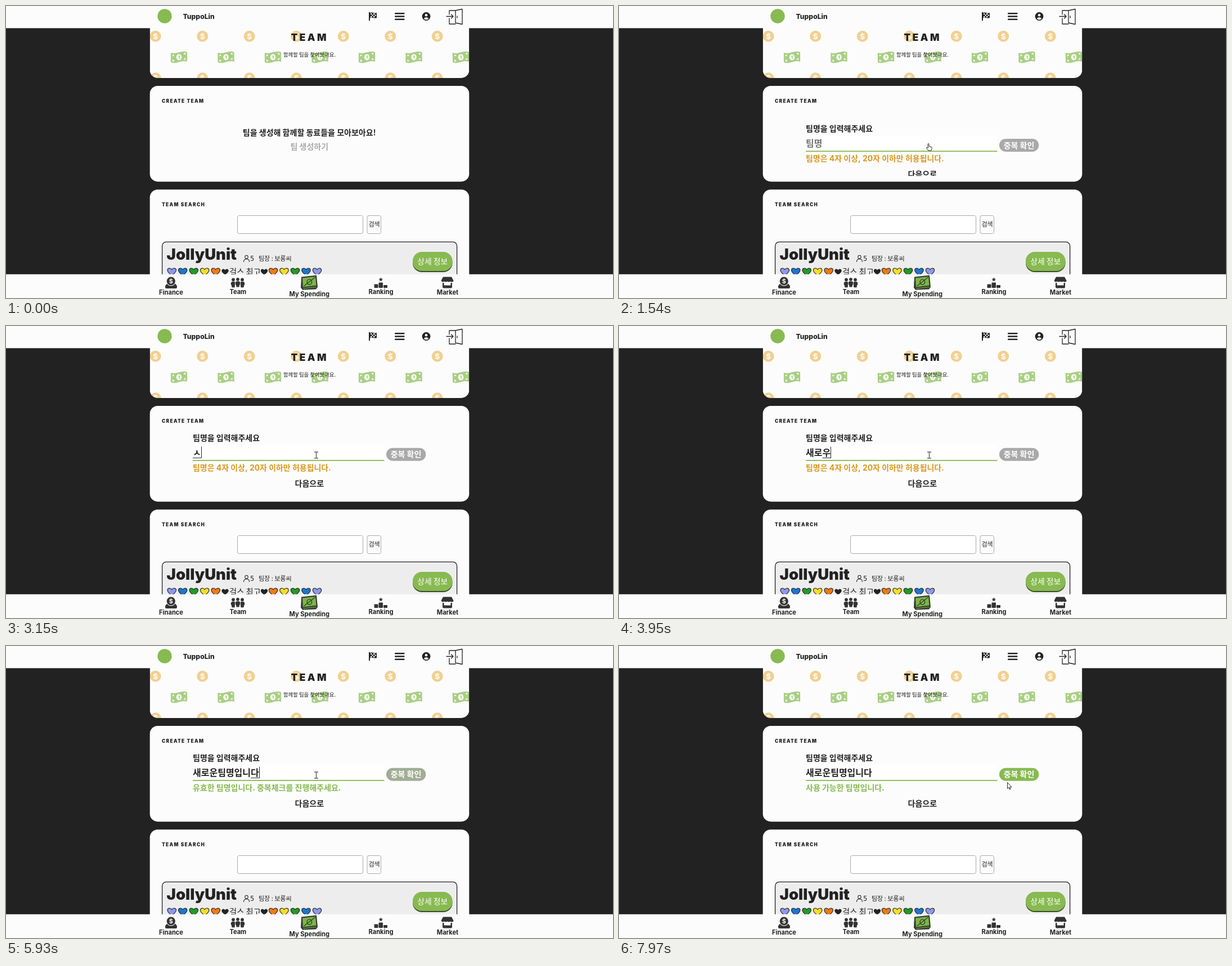
An HTML page with a canvas for the animation above (8 s loop, 1079 by 519 pixels).

```html
<!DOCTYPE html>
<html lang="ko">
<head>
<meta charset="utf-8">
<title>Team</title>
<style>
html, body { margin: 0; width: 100%; height: 100%; overflow: hidden; background: #222; }
canvas { display: block; width: 1079px; height: 519px; }
</style>
</head>
<body>
<canvas id="stage" width="1079" height="519"></canvas>
<script>
const ctx = document.getElementById('stage').getContext('2d');
const LOOP = 8000;
const INK = '#222', PAPER = '#fcfcfc', GREEN = '#87ba51', AMBER = '#d9981f', ICON = '#333';
const KR = '"Noto Sans CJK KR", sans-serif';
const LATIN = 'Inter, "Noto Sans CJK KR", sans-serif';
const LEFT = 255.7, WIDTH = 567.6;

// ---- helpers ----
function box(x, y, w, h, r, fill, stroke, lw = 1) {
  ctx.beginPath();
  ctx.roundRect(x, y, w, h, r);
  if (fill) { ctx.fillStyle = fill; ctx.fill(); }
  if (stroke) { ctx.strokeStyle = stroke; ctx.lineWidth = lw; ctx.stroke(); }
}

function disc(x, y, r, fill, ry = r) {
  ctx.beginPath();
  ctx.ellipse(x, y, r, ry, 0, 0, 7);
  ctx.fillStyle = fill;
  ctx.fill();
}

function shape(d, x, y, scale, fill, stroke, lw = 1) {
  const p = new Path2D(d);
  ctx.save();
  ctx.translate(x, y);
  ctx.scale(scale, scale);
  ctx.lineJoin = ctx.lineCap = 'round';
  if (fill) { ctx.fillStyle = fill; ctx.fill(p); }
  if (stroke) { ctx.strokeStyle = stroke; ctx.lineWidth = lw; ctx.stroke(p); }
  ctx.restore();
}

// y is the middle of the capitals
function text(s, x, y, size, { weight = 700, font = KR, color = INK, align = 'left', gap = 0 } = {}) {
  ctx.font = `${weight} ${size}px ${font}`;
  ctx.letterSpacing = gap + 'px';
  ctx.textAlign = align;
  ctx.fillStyle = color;
  ctx.fillText(s, x, y + size * 0.365);
  ctx.letterSpacing = '0px';
}

const heading = (s, y) => text(s, 277, y, 8.4, { weight: 900, font: LATIN, gap: 1.3 });

function clip(x, y, w, h, r, draw) {
  ctx.save();
  ctx.beginPath();
  ctx.roundRect(x, y, w, h, r);
  ctx.clip();
  draw();
  ctx.restore();
}

const clamp = v => Math.max(0, Math.min(1, v));
const mix = (a, b, k) => `rgb(${a.map((v, i) => Math.round(v + (b[i] - v) * k))})`;

// CSS "ease"
function ease(x) {
  let lo = 0, hi = 1;
  const curve = (s, a, b) => 3 * (1 - s) ** 2 * s * a + 3 * (1 - s) * s * s * b + s ** 3;
  for (let i = 0; i < 20; i++) {
    const mid = (lo + hi) / 2;
    if (curve(mid, 0.25, 0.25) < x) lo = mid; else hi = mid;
  }
  return curve(lo, 0.1, 1);
}

const lastBefore = (list, t) => list.filter(k => k[0] <= t).pop();

// ---- fixed page ----
function coin(x, y) {
  disc(x, y, 10, '#f2d091');
  text('$', x, y, 13.5, { font: LATIN, color: PAPER, align: 'center' });
}

const NOTE = 'M-14.6-8C-9-6-5-7.4 0-8.7S9-11 13.3-9.6q1.3.4 1.3 1.8V8C9 6 5 7.4 0 8.7S-9 11-13.3 9.6q-1.3-.4-1.3-1.8z';
const NOTE_CORNERS = 'M-11.6-4.6q2 .4 3.4.2q-.6 2.8-3.4 3zM11.6 4.6q-2-.4-3.4-.2q.6-2.8 3.4-3z' +
  'M11.6-7.4q-2-.4-3.4.1q.6 2.8 3.4 3zM-11.6 7.4q2 .4 3.4-.1q-.6-2.8-3.4-3z';

function note(x, y) {
  shape(NOTE, x, y, 1, '#a9cf84');
  shape(NOTE_CORNERS, x, y, 1, PAPER);
  disc(x, y, 4.8, PAPER, 5.4);
  text('1', x, y, 8, { weight: 800, font: LATIN, color: '#a0c977', align: 'center' });
}

function banner() {
  clip(LEFT, 20, WIDTH, 107.9, 14, () => {
    ctx.fillStyle = PAPER;
    ctx.fillRect(LEFT, 20, WIDTH, 108);
    for (let i = 0; i < 7; i++) {
      coin(265.7 + i * 83.5, 53.7);
      coin(265.7 + i * 83.5, 128.3);
      note(307.5 + i * 83.5, 91);
    }
  });
  text('TEAM', 506.5, 55.8, 17.3, { weight: 900, font: LATIN, gap: 3.4 });
  text('함께할 팀을 찾아보아요.', 539.5, 87, 9.4, { weight: 400, align: 'center' });
}

function header() {
  ctx.fillStyle = PAPER;
  ctx.fillRect(0, 0, 1079, 39.4);
  disc(282, 18, 12.7, GREEN);
  text('TuppoLin', 314.5, 18.8, 12.2, { weight: 800, font: LATIN });

  // chequered flag
  ctx.fillStyle = INK;
  ctx.fillRect(645, 11, 2, 15);
  shape('M2 1q3-1 6 0t6 0V10q-3 1-6 0t-6 0z', 645, 11, 1, INK);
  ctx.fillStyle = PAPER;
  for (let i = 0; i < 6; i++) ctx.fillRect(648 + (i % 2) * 5 + (i > 1 && i < 4 ? 2.5 : 0), 13 + (i >> 1) * 2.5, 2.3, 2.2);

  for (const y of [12, 17.2, 22.4]) box(691, y, 17.5, 2.6, 1, INK);

  disc(747, 18.5, 7.4, INK);
  disc(747, 16.3, 2.3, PAPER);
  shape('M-4.2 4q1-2.6 4.2-2.6t4.2 2.6q-1.8 1.9-4.2 1.9t-4.2-1.9z', 747, 18.5, 1, PAPER);

  // door with arrow
  shape('M5 10V3H16M5 17V27H16M16 3L28 .5V27.5L16 25zM0 13.5H12M8.5 10L12 13.5L8.5 17M19 13v3', 783, 5, 1, null, INK, 1.3);
}

const HEART = 'M0 6C-4 3-7.7 0-7.7-3.2C-7.7-7.6-2-8.2 0-4.4C2-8.2 7.7-7.6 7.7-3.2C7.7 0 4 3 0 6z';
const HUES = ['#8c99ec', '#1d76cf', '#249a27', '#f8dd25', '#ee7a18'];

function search() {
  box(LEFT, 326.2, WIDTH, 220, 14, PAPER);
  heading('TEAM SEARCH', 352.8);
  box(411.5, 372.5, 223, 32, 3, '#fff', '#aaa');
  box(642, 372.5, 24.5, 32, 3, PAPER, '#aaa');
  text('검색', 654.5, 388, 11, { weight: 400, align: 'center' });

  box(277.6, 419.4, 524, 120, 7, '#ededed', INK, 1.3);
  text('JollyUnit', 285.5, 440.5, 27.5, { weight: 900, font: LATIN });
  shape('M2.8 3.2a2.7 2.9 0 1 0 5.4 0a2.7 2.9 0 1 0-5.4 0M.5 11.5Q.8 6.8 5.5 6.8t5 4.7', 422, 443, 1, null, INK, 1.1);
  text('5', 434, 448.8, 11.5, { weight: 400, font: '"DejaVu Sans", sans-serif' });
  text('팀장 : 보롱씨', 449, 448.5, 11, { weight: 400 });

  HUES.forEach((hue, i) => {
    shape(HEART, 294.7 + i * 19.5, 473, 1, hue, INK, 1.1);
    shape(HEART, 553 - i * 19.5, 473, 1, hue, INK, 1.1);
  });
  shape(HEART, 389.5, 473, 0.8, INK);
  shape(HEART, 459, 473, 0.8, INK);
  text('걸스 최고', 397, 472.5, 14.3, { weight: 400 });

  box(723, 439, 70.5, 34, 16, '#3c4a2c');
  box(723, 437, 70.5, 34, 16, GREEN);
  text('상세 정보', 758.3, 454, 13.8, { weight: 500, color: '#fff', align: 'center' });
}

function footer() {
  ctx.fillStyle = PAPER;
  ctx.fillRect(0, 476.8, 1079, 43);
  const label = (s, x, y) => text(s, x, y, 11.1, { font: LATIN, align: 'center' });

  // coin over a tray
  shape('M0 4L3 0H18L21 4V6.5q0 2-2 2H2q-2 0-2-2z', 283, 493.5, 1, ICON);
  disc(293.3, 489, 8.6, PAPER);
  disc(293.3, 489, 7.6, ICON);
  text('$', 293.3, 489, 11, { font: LATIN, color: PAPER, align: 'center' });
  label('Finance', 293.5, 509);

  // people
  for (const dx of [-8, 8, 0]) {
    const top = dx ? 486.5 : 485.8;
    box(412 + dx - 5, top + 2.9, 10, 11.4, 3, PAPER);
    box(412 + dx - 4.2, top + 3.5, 8.4, 7.2, 3, ICON);
    box(412 + dx - 2.8, top + 7, 5.6, 6.8, 1, ICON);
    disc(412 + dx, top, 2.9, ICON);
  }
  label('Team', 412.3, 508);

  // banknote
  shape('M1 3L28 0L30 21L27 25L3 26L0 22z', 524, 478.5, 1, '#353d33');
  shape('M3 5L26 2.5L27.5 18L4 21z', 524, 478.5, 1, '#7db648');
  shape('M11 12a4.3 4.6 0 1 0 8.6 0a4.3 4.6 0 1 0-8.6 0M6 19L25 4', 524, 478.5, 1, null, '#2f3b2a', 1.3);
  shape('M5 23.5L27 21', 524, 478.5, 1, null, '#7db648', 1);
  label('My Spending', 539.3, 512);

  // podium
  shape('M0-4L1.1-1.3L4-1.1L1.8.8L2.5 3.6L0 2.1L-2.5 3.6L-1.8.8L-4-1.1L-1.1-1.3z', 666.3, 486, 0.95, ICON);
  box(654.5, 494.5, 7, 6.5, 1, ICON);
  box(662.5, 491.5, 7.5, 9.5, 1, ICON);
  box(671, 496, 7, 5, 1, ICON);
  label('Ranking', 666.5, 508);

  // shop
  shape('M3.5 0H18.5L22 6.5Q22 9 19.3 9T16.5 8Q15 9 13.8 9T11 8Q9.5 9 8.2 9T5.5 8Q4 9 2.7 9T0 6.5z', 773.5, 481.5, 1, ICON);
  shape('M2.5 10.5H5V15H17V10.5H19.5V18q0 2-2 2H4.5q-2 0-2-2z', 773.5, 481.5, 1, ICON);
  label('Market', 785, 508.5);
}

// ---- the form ----
const TYPED = [
  [0, ''], [2550, 't'], [2620, 'to'], [2950, ''],
  [3150, 'ㅅ'], [3250, '새'], [3350, '샐'], [3450, '새로'], [3550, '새롱'],
  [3950, '새로우'], [4080, '새로운'], [4200, '새로운ㅌ'], [4320, '새로운티'],
  [4440, '새로운팀'], [4560, '새로운팀ㅁ'], [4670, '새로운팀며'], [4800, '새로운팀명'],
  [5000, '새로운팀명ㅇ'], [5100, '새로운팀명이'], [5200, '새로운팀명입'], [5330, '새로운팀명입ㄴ'],
  [5400, '새로운팀명입니'], [5500, '새로운팀명입닏'], [5600, '새로운팀명입니다']
];
const SLIDE = 1265, FOCUS = 1900, VALID = 5930, HOVER = 6690, PRESS = 7160, DONE = 7300;

function field(t) {
  const typed = lastBefore(TYPED, t)[1];
  ctx.fillStyle = '#fff';
  ctx.fillRect(332, 211, 340.5, 27);
  ctx.fillStyle = GREEN;
  ctx.fillRect(332, 238, 340.5, 1.8);
  text(typed || '팀명', 332, 225, 16, { color: typed ? INK : '#757575' });
  if (t < FOCUS || t >= PRESS) return;
  const end = 332 + (typed ? ctx.measureText(typed).width : 0);
  ctx.fillStyle = INK;
  ctx.fillRect(Math.round(end), 214.5, 1, 20.5);
  if (t >= 3150) ctx.fillRect(end - 14.7, 234, 14.7, 1);
}

function checkButton(t) {
  const on = clamp((t - VALID + 60) / 260);
  const hover = t >= HOVER && t < DONE;
  const down = hover ? (t >= PRESS ? 1.5 : 0.6) : 0;
  if (hover) box(676, 219, 70.3, 23, 11.5, '#3c4a2c');
  box(676, 216.7 + down, 70.3, 23, 11.5, mix([169, 169, 169], [135, 186, 81], on));
  text('중복 확인', 711, 228.2 + down, 14, { color: '#fff', align: 'center' });
}

function form(t) {
  text('팀명을 입력해주세요', 332, 198.7, 14);
  field(t);
  checkButton(t);
  if (t < VALID) text('팀명은 4자 이상, 20자 이하만 허용됩니다.', 332, 252, 13.95, { font: LATIN, color: AMBER });
  else text(t < DONE ? '유효한 팀명입니다. 중복체크를 진행해주세요.' : '사용 가능한 팀명입니다.', 332, 252, 14, { color: GREEN });
  text('다음으로', 539.3, 279.7, 14, { align: 'center' });
}

function create(t) {
  box(LEFT, 141.9, WIDTH, 170.3, 14, PAPER);
  heading('CREATE TEAM', 168.8);
  const slide = 128 * ease(clamp((t - SLIDE) / 500));
  clip(300, 174, 480, 128, 0, () => {
    ctx.translate(0, -slide);
    if (slide < 128) {
      const hover = clamp((t - 700) / 100);
      text('팀을 생성해 함께할 동료들을 모아보아요!', 539.3, 225.3, 14, { align: 'center' });
      text('팀 생성하기', 539.3, 250, 14, { color: mix([170, 170, 170], [34, 34, 34], hover), align: 'center' });
    }
    ctx.translate(0, 128);
    if (slide > 0) form(t);
  });
}

// ---- pointer ----
const POINTER = {
  arrow: ['M0 0V10.5L2.4 8.3L4 12L5.6 11.3L4 7.8H7.2z', '#fff'],
  hand: ['M0 1q0-1 1-1t1 1V5l4 1q1.5.4 1.3 2L6 12.5H1L-2.7 8q0-1.7 1.5-1.2L0 8z', '#fff'],
  beam: ['M-3-5.5H-1Q0-5.5 0-4.5Q0-5.5 1-5.5H3M0-4.5V4.5M-3 5.5H-1Q0 5.5 0 4.5Q0 5.5 1 5.5H3', null]
};
const PATH = [
  [390, 973, 460, 'arrow'], [530, 800, 372, 'arrow'], [670, 620, 282, 'arrow'], [740, 568, 253, 'hand'],
  [810, 549, 244.5, 'hand'], [1790, 549, 244.5, 'hand'], [1880, 546, 234, 'beam'], [2020, 545, 226, 'beam'],
  [2100, 545, 226, 'beam'], [2220, 551.5, 229.5, 'beam'], [6410, 551.5, 229.5, 'beam'],
  [6480, 575, 246, 'arrow'], [6550, 622, 264, 'arrow'], [6620, 682, 273, 'arrow'], [6690, 724, 235, 'hand'],
  [6760, 741, 231.5, 'hand'], [7300, 741, 231.5, 'hand'], [7440, 735, 231, 'arrow'],
  [7830, 735, 231, 'arrow'], [7970, 690.5, 243, 'arrow']
];

function pointer(t) {
  const from = lastBefore(PATH, t);
  if (!from) return;
  const to = PATH[PATH.indexOf(from) + 1] || from;
  const k = to === from ? 0 : (t - from[0]) / (to[0] - from[0]);
  const x = from[1] + (to[1] - from[1]) * k;
  const y = from[2] + (to[2] - from[2]) * k;
  const [d, fill] = POINTER[from[3]];
  shape(d, x, y, 1, fill, fill ? '#111' : '#555', fill ? 0.9 : 1.3);
}

function frame() {
  const t = performance.now() % LOOP;
  ctx.fillStyle = INK;
  ctx.fillRect(0, 0, 1079, 519);
  banner();
  create(t);
  search();
  header();
  footer();
  pointer(t);
  requestAnimationFrame(frame);
}
frame();
</script>
</body>
</html>
```
